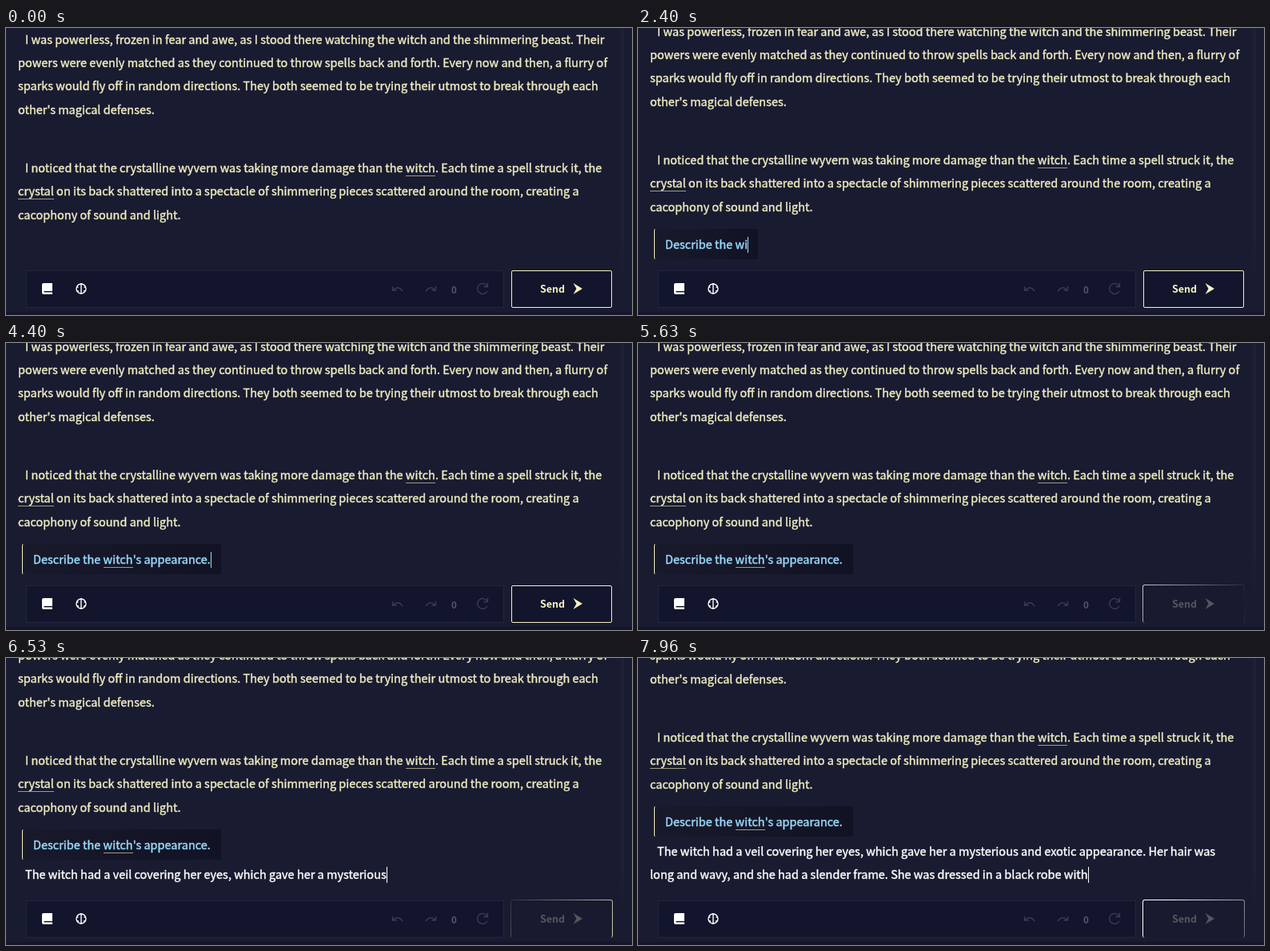
These frames come from a looping animation (783 px wide and 360 px high, 8000 ms). An HTML page:

```html
<!DOCTYPE html>
<html lang="en">
<head>
<meta charset="utf-8">
<style>
html, body { margin: 0; width: 100%; height: 100%; overflow: hidden; background: #191b31; }
body { position: relative; font: 14.5px/30px "Noto Sans CJK JP", "Noto Sans CJK SC", sans-serif; color: #f0eec0; }
div, svg { position: absolute; box-sizing: border-box; }
#story { left: 0; top: 0; width: 783px; -webkit-text-stroke: .4px; }
.line { left: 15px; white-space: pre; height: 30px; }
.in { left: 24px; }
u { text-decoration: none; position: relative; }
u::after { content: ""; position: absolute; left: 0; right: 0; bottom: -1px; height: 1px; background: #f5f3c2; opacity: .6; }
u.off::after { opacity: 0; }
#prompt { left: 20px; top: 262px; height: 38px; padding: 0 13px; border-left: 1px solid #f5f3c2; border-radius: 2px;
  line-height: 37px; white-space: pre; color: #9cdcff; background: linear-gradient(90deg, #181a2b, #111224); }
.ai { color: #fff; }
#caret { top: 262px; width: 1px; height: 20px; }
#rail { left: 769px; top: 0; width: 4px; height: 320px; background: linear-gradient(#1e2039 80%, #191b31); }
#foot { left: 0; top: 291px; width: 769px; height: 69px; background: #191b31; }
#base { left: 0; top: 356px; width: 783px; height: 4px; background: #16142a; }
#bar { left: 25px; top: 304px; width: 598px; height: 47px; background: #13152c; border: 1px solid #22253f; }
#edge { left: 631px; top: 303px; width: 128px; height: 48px; border-radius: 3px;
  background: linear-gradient(120deg, #fff 15%, #191b31 55%, #f5f3c2) 0 50% / 300% 300%; }
#send { left: 632px; top: 304px; width: 126px; height: 47px; border: 1px solid #f5f3c2; border-radius: 2px; }
#label { left: 668px; top: 312px; font-weight: 700; font-size: 12.5px; }
#count { left: 557px; top: 313px; font-weight: 700; font-size: 11.5px; color: #55576c; }
svg { left: 0; top: 0; }
</style>
</head>
<body>
<div id="story"></div>
<div id="rail"></div>
<div id="foot"></div>
<div id="caret"></div>
<div id="base"></div>
<div id="bar"></div>
<div id="edge"></div>
<div id="send"></div>
<div id="label">Send</div>
<div id="count">0</div>
<svg width="783" height="360" fill="none">
  <path d="M47 320h11v14H47q-2 0-2-2v-10q0-2 2-2z" fill="#fff"/>
  <path d="M47.5 330.700h10.500" stroke="#13152c" stroke-width="1.5"/>
  <g stroke="#fff" stroke-width="1.4">
    <circle cx="94" cy="327" r="6"/>
    <path d="M94 320v14M88 325h2.500M100 325h-2.500M89 330h2M99 330h-2"/>
  </g>
  <g stroke="#3a3c54" stroke-width="1.4">
    <path d="M483.500 324v5h5M484 329q6-7 12 1"/>
    <path d="M537.500 324v5h-5M537 329q-6-7-12 1"/>
    <path d="M602 324a6.500 6.500 0 1 0 0 6M602.500 319.500v5h-5"/>
  </g>
  <path id="arrow" d="M709.500 320l11.500 7-11.500 7 4-7z"/>
</svg>
<script>
const $ = id => document.getElementById(id);
const story = $('story'), caret = $('caret');

function addLine(mid, html, cls = '') {
  const el = document.createElement('div');
  el.className = 'line ' + cls;
  el.style.top = Math.round(mid) - 16 + 'px';
  el.innerHTML = html;
  return story.appendChild(el);
}

const PITCH = 29.3;
function addParagraph(mid, lines) {
  lines.forEach((s, i) => addLine(mid + i * PITCH, s, i ? '' : 'in'));
}
addParagraph(14.8, [
  'I was powerless, frozen in fear and awe, as I stood there watching the witch and the shimmering beast. Their',
  'powers were evenly matched as they continued to throw spells back and forth. Every now and then, a flurry of',
  'sparks would fly off in random directions. They both seemed to be trying their utmost to break through each',
  "other's magical defenses."
]);
addParagraph(176.1, [
  'I noticed that the crystalline wyvern was taking more damage than the <u>witch</u>. Each time a spell struck it, the',
  '<u>crystal</u> on its back shattered into a spectacle of shimmering pieces scattered around the room, creating a',
  'cacophony of sound and light.'
]);

const prompt = document.createElement('div');
prompt.id = 'prompt';
story.append(prompt);
const reply = [addLine(319, '', 'in ai'), addLine(348, '', 'ai')];

// Typing bursts: first key, last key, number of keys
const command = "Describe the witch's appearance.";
const keys = [[1090, 1190, 2], [1330, 2130, 10], [2210, 2400, 3], [2530, 2760, 3],
  [3050, 3110, 2], [3250, 4000, 8], [4100, 4400, 4]]
  .flatMap(([a, b, n]) => Array.from({ length: n }, (_, i) => a + (b - a) * i / (n - 1)));

const tokens = ['The witch had a veil covering her eyes, which gave her a mysterious and exotic appearance. Her hair was',
  'long and wavy, and she had a slender frame. She was dressed in a black robe with']
  .map(s => s.match(/ ?\w+|[.,]/g));
const tokenTime = k => k < 27 ? 5760 + 59 * k : 7360 + 50 * (k - 27);
const WRAP = tokenTime(tokens[0].length);

// CSS "ease" curve
function ease(x) {
  let lo = 0, hi = 1;
  for (let i = 0; i < 20; i++) {
    const s = (lo + hi) / 2, r = 1 - s;
    if (3 * r * r * s * .25 + 3 * r * s * s * .25 + s ** 3 < x) lo = s; else hi = s;
  }
  return 3 * (1 - lo) ** 2 * lo * .1 + 3 * (1 - lo) * lo * lo + lo ** 3;
}

function draw(t) {
  const shift = t < 590 ? 0 : t < 5760 ? 10 : t < WRAP ? 47 : 76;
  story.style.transform = `translateY(${-shift}px)`;

  const typed = command.slice(0, keys.filter(k => k <= t).length);
  prompt.style.display = t < 590 ? 'none' : '';
  prompt.innerHTML = typed.replace('witch', `<u class="${t < 2910 ? 'off' : ''}">witch</u>`);

  let k = 0;
  tokens.forEach((list, i) => {
    reply[i].textContent = list.filter(() => tokenTime(k++) <= t).join('');
  });

  const busy = t >= 4780;
  const last = t >= WRAP ? reply[1] : reply[0];
  const end = t < 590 ? 24 : busy ? last.getBoundingClientRect().right : prompt.getBoundingClientRect().right - 13;
  caret.style.left = Math.round(end) + 'px';
  caret.style.background = t >= 590 && !busy ? '#9cdcff' : '#fff';
  caret.style.visibility = t < 110 || busy && t < 5760 ? 'hidden' : '';

  const dim = Math.min(1, Math.max(0, (t - 4780) / 250));
  const mix = (a, b) => `rgb(${a.map((v, i) => v + (b[i] - v) * dim)})`;
  const ink = mix([245, 243, 194], [85, 86, 94]);
  $('label').style.color = ink;
  $('arrow').style.fill = ink;
  $('send').style.background = mix([19, 21, 44], [24, 26, 47]);
  $('send').style.borderColor = `rgba(245,243,194,${1 - dim})`;

  // The glow sweeps out and back every three seconds
  const sweep = (t + 705) % 3000 / 1500;
  const pos = sweep < 1 ? ease(sweep) : 1 - ease(sweep - 1);
  $('edge').style.opacity = dim;
  $('edge').style.backgroundPosition = `${pos * 100}% 50%`;
}

const start = performance.now();
(function tick() {
  draw((performance.now() - start) % 8000);
  requestAnimationFrame(tick);
})();
</script>
</body>
</html>
```
